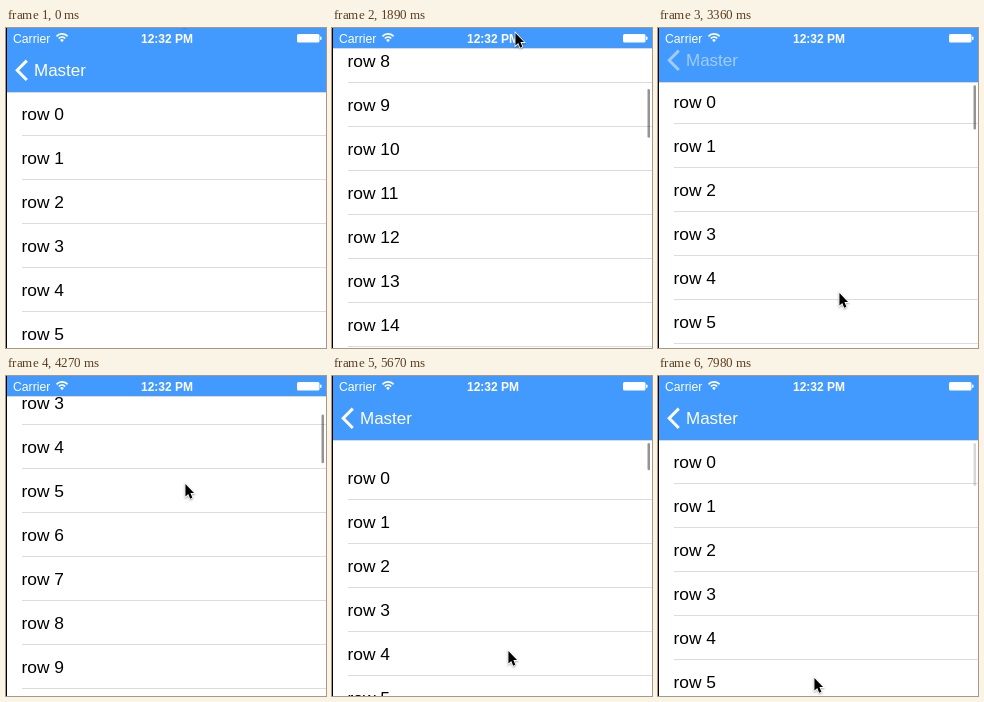
These frames come from a looping animation (320 px wide and 320 px high, 8 s). An HTML page with a canvas:

```html
<!DOCTYPE html>
<html>
<head>
<meta charset="utf-8">
<style>
html, body { margin: 0; width: 100%; height: 100%; overflow: hidden; background: #fff; }
canvas { display: block; width: 320px; height: 320px; }
</style>
</head>
<body>
<canvas id="stage" width="320" height="320"></canvas>
<script>
const LOOP = 8000, STEP = 70, ROW = 44, FULL = 64, MIN = 20;
const BLUE = '#4299fe', FONT = '"Liberation Sans", Arial, sans-serif';

// turning points of the drags: time, distance scrolled
const SCROLL = [
  [1050, 0], [1890, 405], [3150, 3], [4900, 267], [5040, 267], [5600, -17],
  [6440, 55.4], [6720, 250], [7280, 250], [7980, 0]
];
// turning points of the pointer: time, x, y
const POINTER = [
  [70, 173, -16], [560, 166, 330], [1050, 178, 450], [1890, 183, 5],
  [3150, 181, 477], [3360, 181, 265], [4900, 178, 20], [5040, 178, 20],
  [5600, 176, 276], [6440, 178, 218], [6720, 177, 39], [7070, 197, 13],
  [7280, 198, 12], [7980, 156, 302]
];

const ctx = document.getElementById('stage').getContext('2d');
const clamp = (v, a, b) => Math.min(b, Math.max(a, v));

// cosine easing between turning points
function ease(keys, t) {
  const i = keys.findIndex(k => k[0] >= t);
  const b = keys[i], a = keys[Math.max(0, i - 1)];
  const f = a === b ? 0 : (1 - Math.cos(Math.PI * (t - a[0]) / (b[0] - a[0]))) / 2;
  return a.map((v, j) => v + (b[j] - v) * f).slice(1);
}

// the bar hides at once on the way down the list, returns late on the way up
function barEdge(t, scroll) {
  const returning = ease(SCROLL, t - 1)[0] > scroll;
  return Math.round(clamp(FULL - 0.79 * (scroll - (returning ? 128 : 0)), MIN, FULL));
}

function label(text, x, y, size, color, weight = '', align = 'left') {
  ctx.font = `${weight} ${size}px ${FONT}`;
  ctx.textAlign = align;
  ctx.fillStyle = color;
  ctx.fillText(text, x, y);
}

function box(x, y, w, h, color) {
  ctx.fillStyle = color;
  ctx.fillRect(x, y, w, h);
}

function pill(x, y, w, h, r, color) {
  ctx.fillStyle = color;
  ctx.beginPath();
  ctx.roundRect(x, y, w, h, r);
  ctx.fill();
}

function drawRows(top) {
  for (let i = Math.max(0, Math.floor(-top / ROW)); top + i * ROW < 320; i++) {
    const y = top + i * ROW;
    label('row ' + i, 15.5, y + 28, 17.4, '#000');
    box(16, y + 43, 304, 1, '#dcdbdf');
  }
}

function drawIndicator(scroll, bar, alpha) {
  const off = scroll - (FULL - bar);
  const len = 43 + (FULL - bar) * 0.13 + Math.min(0, scroll);
  ctx.globalAlpha = alpha;
  pill(315.5, bar + 3 + Math.max(0, off) * 0.105, 2.5, len, 1.25, 'rgba(0,0,0,.42)');
  ctx.globalAlpha = 1;
}

function drawStatus() {
  label('Carrier', 7, 14.5, 12.2, '#fff');
  label('12:32 PM', 161, 14.5, 12, '#fff', 'bold', 'center');
  // wifi
  ctx.strokeStyle = '#fff';
  ctx.lineWidth = 1.7;
  for (const r of [4.4, 7.6]) {
    ctx.beginPath();
    ctx.arc(56, 13.5, r, -Math.PI * 0.76, -Math.PI * 0.24);
    ctx.stroke();
  }
  ctx.fillStyle = '#fff';
  ctx.beginPath();
  ctx.moveTo(56, 14.3);
  ctx.arc(56, 13.5, 2.4, -Math.PI * 0.78, -Math.PI * 0.22);
  ctx.fill();
  // battery
  pill(291, 6, 22.5, 8.5, 1.5, '#fff');
  pill(314, 8.5, 1.5, 3.4, 0.7, '#fff');
}

function drawBar(bar) {
  box(0, 0, 320, bar, BLUE);
  box(0, bar, 320, 0.5, 'rgba(0,0,0,.3)');
  ctx.globalAlpha = clamp((bar - 44) / 20, 0, 1);
  const dy = bar - FULL;
  ctx.strokeStyle = '#fff';
  ctx.lineWidth = 3;
  ctx.beginPath();
  ctx.moveTo(20.8, 32.6 + dy);
  ctx.lineTo(11.2, 42.3 + dy);
  ctx.lineTo(20.8, 52 + dy);
  ctx.stroke();
  label('Master', 28, 48 + dy, 17, '#fff');
  ctx.globalAlpha = 1;
  drawStatus();
}

function drawCursor(x, y) {
  ctx.save();
  ctx.translate(x, y);
  ctx.scale(0.86, 0.9);
  const arrow = new Path2D('M.5 0V14L3.8 11L6 16.3L8.6 15.2L6.3 10.1H10.5Z');
  ctx.shadowColor = 'rgba(0,0,0,.35)';
  ctx.shadowBlur = 2;
  ctx.shadowOffsetY = 1;
  ctx.strokeStyle = '#fff';
  ctx.lineWidth = 1.8;
  ctx.stroke(arrow);
  ctx.shadowColor = 'transparent';
  ctx.fillStyle = '#000';
  ctx.fill(arrow);
  ctx.restore();
}

function draw() {
  const now = (performance.now() - start) % LOOP;
  const t = Math.floor(now / STEP) * STEP;
  const [scroll] = ease(SCROLL, t);
  const [x, y] = ease(POINTER, t);
  const bar = barEdge(t, scroll);
  const shown = t <= 1050 ? 0 : clamp((8060 - t) / 220, 0, 1);
  box(0, 0, 320, 320, '#fff');
  drawRows(FULL - Math.round(scroll));
  drawIndicator(scroll, bar, shown);
  drawBar(bar);
  box(0, 0, 1, 320, '#000');
  drawCursor(Math.round(x), Math.round(y));
  requestAnimationFrame(draw);
}

const start = performance.now();
draw();
</script>
</body>
</html>
```
